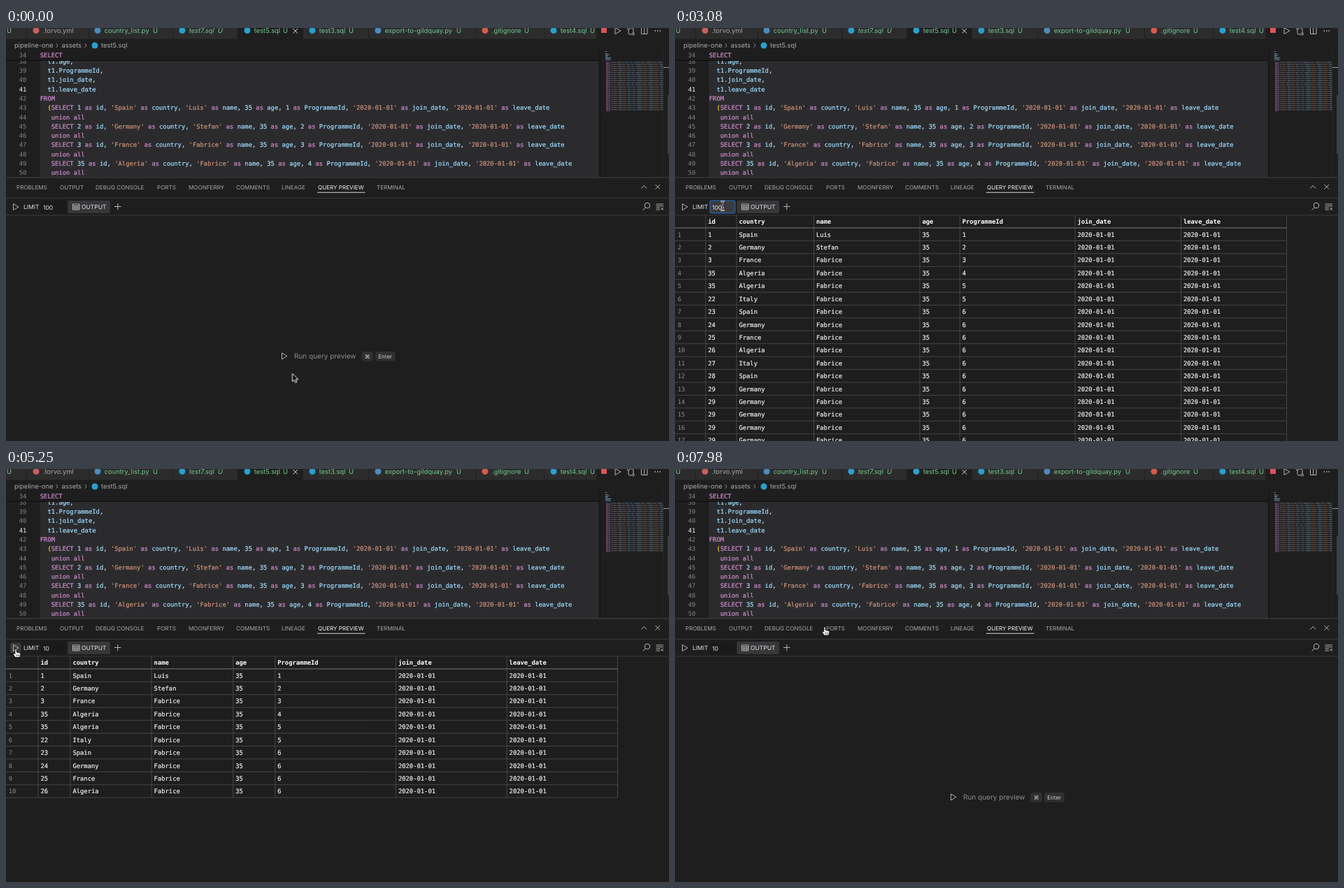
These frames come from a looping animation (948x591 px, 8 s). An HTML page:

```html
<!DOCTYPE html>
<html lang="en">
<head>
<meta charset="utf-8">
<title>Query preview</title>
<style>
html, body { margin: 0; width: 100%; height: 100%; overflow: hidden; background: #1e1e1e; }
svg { display: block; width: 948px; height: 591px; }
text { white-space: pre; text-rendering: geometricPrecision; }
.ui { font: 9.4px Inter, "Open Sans", sans-serif; fill: #a9a9a9; }
.new { fill: #73c991; }
.it { font-style: italic; }
.cap { font-size: 8.1px; fill: #a8a8a8; }
.btn { font-size: 8.5px; fill: #e4e4e4; }
.big { font-size: 10px; fill: #8c8c8c; }
.key { font: 8px Inter, "DejaVu Sans", sans-serif; fill: #ccc; }
.mono {
  font: 8.84px "DejaVu Sans Mono", monospace;
  color: #9cdcfe; fill: currentColor; stroke: currentColor; stroke-width: .22;
}
.cell { color: #ececec; }
.head { font-weight: bold; color: #fff; stroke: none; }
.num { color: #858585; text-anchor: end; stroke: none; }
.kw { color: #d08ccb; fill: currentColor; stroke: currentColor; }
.str { color: #ce9178; fill: currentColor; stroke: currentColor; }
.lit { color: #a6dcf2; fill: currentColor; stroke: currentColor; }
.pun { color: #d4d4d4; fill: currentColor; stroke: currentColor; }
.par { color: #ffd700; fill: currentColor; stroke: currentColor; }
.on { color: #f4f4f4; fill: #f4f4f4; }
.ico { fill: none; stroke: #c5c5c5; stroke-width: .9; }
.grid { fill: none; stroke: #4b4b4b; stroke-width: .9; }
</style>
</head>
<body>
<svg viewBox="0 0 948 591">
  <defs>
    <linearGradient id="fade">
      <stop offset=".1" stop-color="#d95f62"/><stop offset=".8" stop-color="#fff"/>
    </linearGradient>
    <clipPath id="mapClip"><rect x="850" y="31" width="89.5" height="182"/></clipPath>
  </defs>
  <rect width="948" height="591" fill="#1e1e1e"/>

  <g id="editor">
    <rect x="48.5" y="46" width="799" height="167.5" fill="#2b2b2e"/>
    <g id="code"></g>
    <rect y="31" width="848" height="15" fill="#1e1e1e"/>
    <path d="M0 46.4H848" stroke="#101010" stroke-width="1.4"/>
    <g id="sticky"></g>
    <path d="M849.3 31V213" stroke="#151515" stroke-width="1.5"/>
    <g id="map" clip-path="url(#mapClip)"></g>
    <path d="M940 33V213" stroke="#303030" stroke-width=".7"/>
    <path d="M947 96V180" stroke="#4a4a4a" stroke-width="1.5"/>
    <path d="M940 56.5H948" stroke="#9a9a9a"/>
  </g>

  <g id="tabs"></g>
  <g class="ico">
    <path d="M410.5 1 417 7.5M417 1 410.5 7.5" stroke="#eee"/>
    <path d="M871 -.5V8.5L879 4Z"/>
    <path d="M890 2V7.5Q890 9 892 9H895M897 7V1.5Q897 0 895 0H892"/><circle cx="890" cy="0.5" r="1.5"/><circle cx="897" cy="8.5" r="1.5"/>
    <path d="M908.5 -1H917V8.5H908.5ZM912.7 -1V8.5"/>
    <path d="M927.5 4H936" stroke-width="1.5" stroke-dasharray="1.5 2"/>
    <path d="M71.5 22 74 25 71.5 28M112.5 22 115 25 112.5 28" stroke="#999"/>
  </g>
  <rect x="851" y="-1" width="8" height="8" fill="#df5458"/>

  <path d="M0 214H948" stroke="#454545"/>
  <g id="panelTabs"></g>
  <path d="M445 235.3H513.5" stroke="#e7e7e7" stroke-width=".9"/>
  <path class="ico" d="M908.5 229.5 912.3 225.5 916 229.5M928.5 224 935 230.5M935 224 928.5 230.5"/>

  <g id="toolbar">
    <path d="M0 243.5H948M0 268H948" stroke="#3d3d3d" stroke-width=".9"/>
    <rect x="50" y="247" width="36" height="18" rx="2" fill="#1a1a1a"/>
    <rect id="runHover" x="6" y="248.5" width="15.5" height="15" rx="3" fill="#3a3b3c"/>
    <rect id="clearHover" x="927" y="248" width="16" height="16" rx="3" fill="#3a3b3c"/>
    <path class="ico" d="M10.5 251.5V260.5L18 256Z" stroke="#ddd"/>
    <rect id="focus" x="50" y="247" width="36" height="18" rx="2" fill="#3b3b3d" stroke="#1f6fd0"/>
    <rect x="88.5" y="247" width="60.5" height="18" rx="2" fill="#37373a"/>
    <path class="ico" d="M95.5 252H105V260H95.5ZM95.5 254.5H105M95.5 257.3H105M98.7 254.5V260M102 254.5V260" stroke="#ddd" stroke-width=".8"/>
    <path class="ico" d="M155 255.5H164.5M159.8 251V260.3"/>
    <circle class="ico" cx="917" cy="254" r="3.8"/>
    <path class="ico" d="M914.3 256.8 910.5 260.8M929.5 252H940M929.5 254.7H940M929.5 257.4H935M929.5 260H935M936.5 257 940 260.5M940 257 936.5 260.5"/>
    <text class="ui btn" x="25" y="259">LIMIT</text>
    <text class="ui btn" x="108" y="259">OUTPUT</text>
    <text id="limit100" class="ui btn" x="53" y="259.6">100</text>
    <text id="limit10" class="ui btn" x="53" y="259.6">10</text>
    <rect id="caretA" x="67.5" y="251" width=".9" height="10" fill="#eee"/>
    <rect id="caretB" x="62" y="251" width=".9" height="10" fill="#eee"/>
  </g>

  <g id="empty">
    <path class="ico" d="M394.5 465V474L402 469.5Z"/>
    <text class="ui big" x="412" y="473">Run query preview</text>
    <rect x="508.5" y="463" width="16.5" height="13.5" rx="2" fill="#303031"/>
    <rect x="528" y="463" width="28.5" height="13.5" rx="2" fill="#303031"/>
    <text class="key" x="516.7" y="472.5" text-anchor="middle">⌘</text>
    <text class="key" x="542.2" y="472.5" text-anchor="middle">Enter</text>
  </g>

  <g id="loading"><g transform="translate(475 440.7)"><g id="spin">
    <rect x="-10.4" y="-10.4" width="20.8" height="20.8" fill="none" stroke="url(#fade)" stroke-width="2.7"/>
  </g></g></g>

  <rect id="rowHover" y="452" width="875" height="18.4" fill="#48484a"/>
  <g id="wide"></g>
  <g id="short"></g>

  <g id="mouse">
    <g id="ring" fill="none" transform="translate(1 1)">
      <circle r="22" stroke="#000" stroke-width="4"/><circle r="22" stroke="#fff" stroke-width="1.8"/>
    </g>
    <path id="arrow" d="M0 0V11.3L2.6 9 4.4 13 6.4 12.1 4.7 8.2H8.2Z" fill="#000" stroke="#fff" stroke-width="1"/>
    <g id="hand" stroke="#000" stroke-width=".9">
      <path d="M-1.2 1.2Q0-.8 1.2 1V5L6.2 6.2Q7.2 6.8 6.9 8.5L5.8 12.6H-.6L-3.8 8.2Q-4 6.6-2.6 6.8L-1.2 8Z" fill="#fff"/>
      <path d="M1.2 8.2V11M3 8.2V11M4.8 8.2V11" stroke-width=".6"/>
    </g>
    <g id="beam" fill="none">
      <path d="M-3-6Q0-6 0-4V5Q0 7-3 7M3-6Q0-6 0-4V5Q0 7 3 7M-1.5 3H1.5" stroke="#fff" stroke-width="2.2"/>
      <path d="M-3-6Q0-6 0-4V5Q0 7-3 7M3-6Q0-6 0-4V5Q0 7 3 7" stroke="#111" stroke-width=".8"/>
    </g>
  </g>
</svg>

<script>
const LOOP = 8000;
const $ = id => document.getElementById(id);
const fill = (id, parts) => { $(id).innerHTML = parts.join(''); };
const text = (x, y, cls, s) => `<text x="${x}" y="${y}" class="${cls}">${s}</text>`;
const rect = (x, y, w, h, c) => `<rect x="${x}" y="${y}" width="${w}" height="${h}" fill="${c}"/>`;

// Query data
const HEAD = ['id', 'country', 'name', 'age', 'ProgrammeId', 'join_date', 'leave_date'];
const IDS = [1, 2, 3, 35, 35, 22, 23, 24, 25, 26, 27, 28];
const COUNTRIES = ['Spain', 'Germany', 'France', 'Algeria', 'Algeria', 'Italy',
  'Spain', 'Germany', 'France', 'Algeria', 'Italy', 'Spain'];
const record = i => [IDS[i] || 29, COUNTRIES[i] || 'Germany', ['Luis', 'Stefan'][i] || 'Fabrice', 35,
  i < 5 ? i + 1 : i < 6 ? 5 : 6, '2020-01-01', '2020-01-01'];
const select = i => 'SELECT ' + record(i).map((v, c) =>
  `${typeof v === 'string' ? `'${v}'` : v} as ${HEAD[c]}`).join(', ');

// Code editor
const TOKEN = /('[^']*')|\b(SELECT|FROM|as|union|all)\b|\b(\d+)\b|([,.])|(\()/g;
const CLASSES = ['str', 'kw', 'lit', 'pun', 'par'];
const paint = s => s.replace(TOKEN, (m, ...g) =>
  `<tspan class="${CLASSES[g.findIndex((v, i) => i < 5 && v)]}">${m}</tspan>`);
const codeLine = (n, y, indent, s) =>
  text(29.3, y, 'mono num' + (n === 41 ? ' on' : ''), n) + text(48.8 + indent * 5.322, y, 'mono', paint(s));

const lines = [
  [2, 't1.age,'], [2, 't1.ProgrammeId,'], [2, 't1.join_date,'], [2, 't1.leave_date'], [0, 'FROM'],
  [2, '(' + select(0)], [3, 'union all'], [3, select(1)], [3, 'union all'],
  [3, select(2)], [3, 'union all'], [3, select(3)], [3, 'union all']
];
fill('code', lines.map(([indent, s], i) => codeLine(38 + i, 50.9 + i * 13.27, indent, s)));
fill('sticky', [codeLine(34, 42, 0, 'SELECT')]);

// Minimap: every word becomes a small bar
const wordColor = w => /^'/.test(w) ? '#80604f' : /^(SELECT|as|union|all)$/.test(w) ? '#7d577b' : '#5f8598';
const mini = (x, y, s) => {
  let out = '', i = 0;
  for (const w of s.split(' ')) {
    out += rect(x + i * .6, y, w.length * .6, .9, wordColor(w));
    i += w.length + 1;
  }
  return out;
};
const map = [mini(856, 33, 'SELECT')];
HEAD.forEach((h, i) => map.push(mini(857, 36 + i * 1.48, 't1.' + h)));
for (let i = 0; i < 24; i++) {
  const y = 48.6 + i * 2.95;
  map.push(mini(858, y, select(i)), mini(858, y + 1.48, 'union all'));
}
fill('map', map);

// File tabs: left edge, icon centre, label, colour, status x
const BLUE = '#2a9fd0', PY = '#4b8bbe', RED = '#d65a4a';
const files = [
  [29, 43, '.torvo.yml', '#c9605c', 0], [118, 131, 'country_list.py', PY, 210],
  [238, 252, 'test7.sql', BLUE, 303], [331, 345, 'test5.sql', BLUE, 396],
  [424, 438, 'test3.sql', BLUE, 490], [518, 532, 'export-to-gildquay.py', PY, 644],
  [671, 685, '.gitignore', RED, 741], [769, 783, 'test4.sql', BLUE, 835]
];
const tabs = [rect(0, 0, 844, 15.5, '#2c2c2d'), rect(331, 0, 93, 16, '#1e1e1e'), text(1, 6.7, 'ui new', 'U')];
for (const [edge, icon, name, color, status] of files) {
  const cls = 'ui' + (status ? ' new' : '') + (name === 'test7.sql' ? ' it' : '');
  tabs.push(rect(edge, 0, .8, 15.5, '#1f1f1f'), `<circle cx="${icon}" cy="3.5" r="4.5" fill="${color}"/>`,
    text(icon + 9.7, 6.7, cls, name), status ? text(status, 6.7, cls, 'U') : '');
}
tabs.push(text(12, 28.2, 'ui', 'pipeline-one'), text(79.5, 28.2, 'ui', 'assets'),
  `<circle cx="127" cy="25" r="4.5" fill="${BLUE}"/>`, text(136, 28.2, 'ui', 'test5.sql'));
fill('tabs', tabs);

const panels = [[15, 'PROBLEMS'], [77, 'OUTPUT'], [128, 'DEBUG CONSOLE'], [216, 'PORTS'], [261, 'MOONFERRY'],
  [329, 'COMMENTS'], [394, 'LINEAGE'], [446, 'QUERY PREVIEW'], [530, 'TERMINAL']];
fill('panelTabs', panels.map(([x, s]) => text(x, 230.8, 'ui cap' + (x === 446 ? ' on' : ''), s)));

// Result tables
function table(id, cols, count) {
  const ROW = 18.42, top = 286, bottom = top + count * ROW;
  const row = (y, cells, cls) => cells.map((s, c) => text(cols[c] + 3.4, y, 'mono ' + cls, s)).join('');
  let rules = `M0 ${top}H875`;
  for (const x of [...cols, 874.5]) rules += `M${x} 268V${bottom}`;
  const out = [row(280, HEAD, 'head')];
  for (let i = 0; i < count; i++) {
    const y = top + i * ROW + 12.6;
    rules += `M0 ${top + (i + 1) * ROW}H875`;
    out.push(text(3.7, y, 'mono', `<tspan fill="#8d8d8d" stroke="none">${i + 1}</tspan>`), row(y, record(i), 'cell'));
  }
  out.unshift(`<path class="grid" d="${rules}"/><path d="M0 286H875" stroke="#666"/>`);
  fill(id, out);
}
table('wide', [43.8, 88, 198.5, 350, 407.3, 572, 723.5], 17);
table('short', [46, 92, 208.2, 324.8, 384.8, 557.5, 716.2], 10);

// Timeline, all times in ms
const rules = [];
function keys(id, frames, timing) {
  const body = frames.map(([t, css]) => `${t / LOOP * 100}%{${css}}`).join('');
  rules.push(`@keyframes ${id}{${body}}#${id}{animation:${id} ${LOOP}ms ${timing} infinite}`);
}
const show = (id, ...spans) => keys(id, [[0, 'opacity:0'],
  ...spans.flatMap(([a, b]) => [[a, 'opacity:1'], [b, 'opacity:0']])], 'step-end');

show('empty', [0, 770], [7350, LOOP]);
show('toolbar', [0, 770], [1540, 4410], [5180, LOOP]);
show('loading', [770, 1540], [4410, 5180]);
show('wide', [1540, 4410]);
show('short', [5180, 7350]);
show('rowHover', [1610, 1960]);
show('runHover', [4130, 4410], [5250, 5880]);
show('clearHover', [7070, 7770]);
show('focus', [2380, 4410]);
show('limit100', [0, 3290]);
show('limit10', [3290, LOOP]);
show('caretA', [2380, 3080]);
show('caretB', [3290, 3640]);
show('arrow', [0, 490], [770, 2240], [3780, 4130], [4410, 5250], [5880, 7070]);
show('hand', [490, 770], [4130, 4410], [5250, 5880], [7070, LOOP]);
show('beam', [2240, 3290]);
show('ring', ...[700, 2310, 4340, 7280].map(t => [t, t + 140]));

const turn = d => `transform:rotate(${d}deg)`;
keys('spin', [[0, turn(0)], [770, turn(0)], [1540, turn(277)], [1541, turn(0)],
  [4410, turn(0)], [5180, turn(277)], [LOOP, turn(277)]], 'linear');

const path = [
  [0, 409.5, 494.5], [70, 409.5, 494.5], [280, 403, 483], [560, 430, 467], [1750, 430, 467],
  [1820, 290, 370], [1890, 125, 260], [2170, 92, 230], [2310, 68, 254], [3710, 68, 254],
  [4200, 14, 257], [5810, 14, 257], [5940, 330, 240], [6020, 649, 262], [6440, 649, 262],
  [7140, 937, 255], [7700, 937, 255], [7980, 214, 225.5], [LOOP, 214, 225.5]
];
keys('mouse', path.map(([t, x, y]) => [t, `transform:translate(${x}px,${y}px)`]), 'linear');

const sheet = document.createElement('style');
sheet.textContent = rules.join('\n');
document.head.append(sheet);
</script>
</body>
</html>
```
